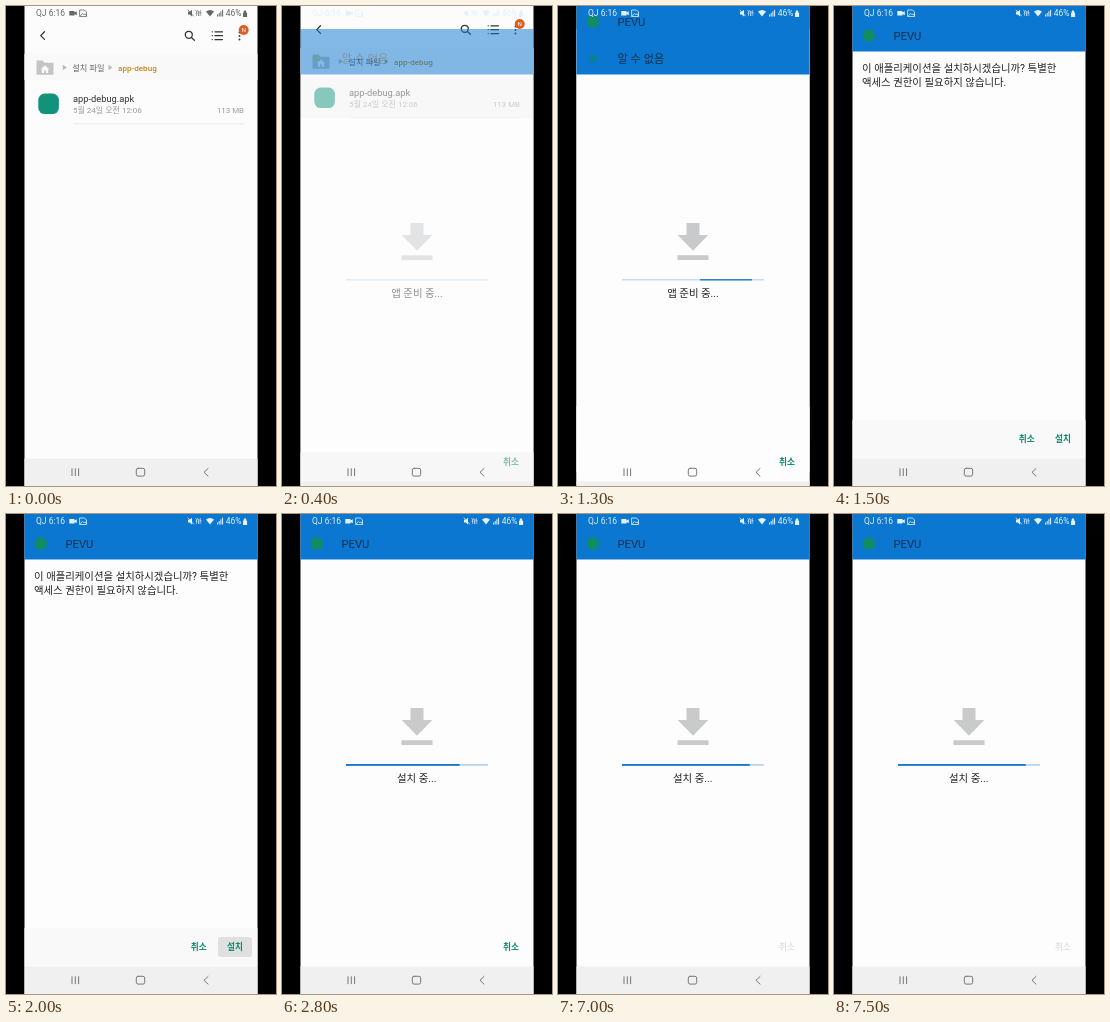
These frames come from a looping animation (270x480 px, 8000 ms). An HTML page:

```html
<!DOCTYPE html>
<html lang="ko">
<head>
<meta charset="utf-8">
<title>App install</title>
<style>
  html, body { margin: 0; width: 100%; height: 100%; overflow: hidden; background: #000; }
  svg { display: block; width: 100%; height: 100%; }
  text { font-family: Roboto, "Noto Sans CJK KR", "Noto Sans CJK", sans-serif; white-space: pre; }
  .line { fill: none; stroke-linecap: round; stroke-linejoin: round; }
  .title { font-size: 11.2px; fill: #12304a; }
  .body { font-size: 10.4px; fill: #222; }
  .status { font-size: 8.5px; }
  .button { font-size: 8.7px; font-weight: 700; fill: #0c8c72; }
  .button.off { font-weight: 400; fill: #d6d6d6; }
</style>
</head>
<body>
<svg viewBox="0 0 270 480">
  <defs>
    <clipPath id="screen"><rect x="18.5" width="233" height="480"/></clipPath>
    <g id="download" fill="#c8cacc">
      <path d="M128.500 194h13v12h8.800L135 221.800 119.700 206h8.800z"/>
      <path d="M119.500 226.300h31v4.800h-31z"/>
    </g>
    <g id="window">
      <rect x="18" width="234" height="480" fill="#fdfdfd"/>
      <rect x="18" y="452.500" width="234" height="40" fill="#f0f0f0"/>
      <rect x="18" y="0" width="234" height="45.500" fill="#0b77d0"/>
    </g>
  </defs>

  <rect width="270" height="480"/>
  <g clip-path="url(#screen)">
    <g id="files">
      <rect x="18" width="234" height="500" fill="#fcfcfc"/>
      <rect x="18" y="48" width="234" height="26" fill="#f9f9f9"/>
      <rect x="18" y="452.500" width="234" height="48" fill="#f0f0f0"/>
      <rect id="press" x="18" y="77" width="234" height="41" fill="#000"/>
      <g class="line" stroke="#333" stroke-width="1.300">
        <path d="M38.500 25.800l-3.800 3.800 3.800 3.800"/>
        <circle cx="182.800" cy="28.800" r="3.500"/>
        <path d="M185.500 31.500l2.800 2.800M209 25.800h7.500M209 29.700h7.500M209 33.600h7.500M206.200 25.800h.1M206.200 29.700h.1M206.200 33.600h.1"/>
        <path d="M233.500 26.500v.1M233.500 30v.1M233.500 33.500v.1" stroke-width="1.900"/>
      </g>
      <circle cx="237.700" cy="24" r="5" fill="#dc5f20"/>
      <text x="237.700" y="26.300" font-size="6.200" fill="#fff" text-anchor="middle">N</text>

      <path d="M30.500 54.500h6l2 2.200h9v12h-17z" fill="#c4c4c4"/>
      <path d="M39 59.300l-4.300 3.900h1.200v3.800h2.200v-2.600h1.800v2.600h2.200v-3.800h1.200z" fill="#fafafa"/>
      <path d="M56.800 58.800l4.200 2.700-4.200 2.700zM102.500 58.800l4.200 2.700-4.200 2.700z" fill="#bbb"/>
      <text x="66.300" y="64.600" font-size="8.200" fill="#666">설치 파일</text>
      <text x="112" y="64.600" font-size="8.100" font-weight="500" fill="#c9851c">app-debug</text>

      <rect x="32.300" y="87.500" width="20.600" height="20.600" rx="6.500" fill="#12917b"/>
      <text x="67" y="95.800" font-size="9.300" fill="#333">app-debug.apk</text>
      <text x="67" y="107.300" font-size="8" fill="#999">5월 24일 오전 12:06</text>
      <text x="238" y="107.300" font-size="7.900" fill="#999" text-anchor="end">113 MB</text>
      <path d="M67 117.800h171" stroke="#e6e6e6" stroke-width=".8"/>
    </g>

    <g id="install">
      <rect x="18" y="-40" width="234" height="41" fill="#0b77d0"/>
      <use href="#window"/>
      <circle cx="34.700" cy="29.600" r="6.300" fill="#128c66"/>
      <text class="title" x="59.500" y="34">PEVU</text>
      <g id="confirm">
        <rect x="18" y="414" width="234" height="38.500" fill="#f9f9f9"/>
        <text class="body" x="28" y="66">이 애플리케이션을 설치하시겠습니까? 특별한</text>
        <text class="body" x="28" y="79.800">액세스 권한이 필요하지 않습니다.</text>
        <rect id="tap" x="212" y="423" width="34" height="20" rx="3" fill="#000"/>
        <text class="button" x="184.700" y="436.400">취소</text>
        <text class="button" x="221" y="436.400">설치</text>
      </g>
      <g id="progress">
        <use href="#download"/>
        <rect x="64" y="250" width="142" height="1.800" fill="#bdd6ee"/>
        <rect id="done" x="64" y="250" height="1.800" fill="#1477c8"/>
        <text class="body" x="134.700" y="267.600" font-size="10.800" text-anchor="middle">설치 중...</text>
        <text class="button" id="cancel" x="221" y="436.400">취소</text>
      </g>
    </g>

    <g id="prepare">
      <use href="#window"/>
      <circle cx="34.700" cy="29.400" r="4" fill="#0f7f91"/>
      <text class="title" x="59.500" y="33.900">알 수 없음</text>
      <use href="#download"/>
      <rect x="64" y="250" width="142" height="1.500" fill="#c6dcf0"/>
      <rect id="sweep" y="250" height="1.500" fill="#2b83c9"/>
      <text class="body" x="135" y="267.600" text-anchor="middle">앱 준비 중...</text>
      <text class="button" x="221" y="436.400">취소</text>
    </g>

    <g id="bar">
      <text class="status" x="30" y="10.300" fill="currentColor">QJ 6:16</text>
      <g fill="currentColor">
        <path d="M63.300 5h5.200v1.500l2.300-1.200v3.900l-2.300-1.200v1.500h-5.200z"/>
        <path d="M182 5.800h1.700l2.300-2v6.800l-2.300-2H182z"/>
        <text x="189.500" y="7" font-size="3.600" font-weight="700">VoL</text>
        <text x="189.500" y="10.300" font-size="3.600" font-weight="700">TE1</text>
        <path d="M200 5.400q4-3 8 0l-4 5z"/>
        <path d="M211 8.500h1v2h-1zM212.700 7h1v3.500h-1zM214.400 5.300h1v5.200h-1zM216.100 3.700h1v6.800h-1z"/>
        <path d="M237 6.700h.7V5.500q1.300-2.600 2.600 0v1.200h.8v4.200H237z"/>
      </g>
      <g class="line" stroke="currentColor" stroke-width=".8">
        <path d="M74 4h4.500l2 2v4.500H74zM74.500 9.800l2-2.500 1.500 1.500 1-1 1.500 2M182 4l5.500 6"/>
      </g>
      <text class="status" x="219.700" y="10.300" fill="currentColor">46%</text>
    </g>
    <g class="line" stroke="#777" stroke-width="1">
      <path d="M66 462.700v7M69.300 462.700v7M72.600 462.700v7M202 462.500l-4 3.800 4 3.800"/>
      <rect x="130.300" y="462.300" width="8.400" height="7.800" rx="1.800"/>
    </g>
  </g>
</svg>
<script>
  const LOOP = 8000, STEP = 100, BAR_X = 64, BAR_W = 142;
  const $ = id => document.getElementById(id);

  // Each track is a list of [time, value] pairs, joined by straight lines.
  const tracks = {
    press: [[100, 0], [200, .05], [300, .08], [500, 0]],
    filesY: [[300, 0], [400, -6], [500, -13], [600, -14]],
    prepareY: [[300, 30], [400, 23], [500, 5], [600, 0], [1200, 0], [1300, 23], [1400, 30]],
    prepareAlpha: [[300, 0], [400, .5], [500, 1], [1300, 1], [1400, .35], [1500, 0]],
    head: [[450, 0], [600, .15], [900, .47], [1300, .915], [1400, 1]],
    tail: [[700, 0], [1000, .22], [1300, .55], [1500, .8]],
    installY: [[1300, -14], [1400, -4], [1500, 0]],
    tap: [[1700, 0], [1800, .05], [2000, .1], [2100, 0]],
    done: [[2100, .04], [2600, .795], [2700, .795], [2800, .8], [5200, .8], [5300, .9]]
  };

  function valueAt(track, t) {
    const next = track.findIndex(([time]) => time > t);
    if (next === 0) return track[0][1];
    if (next < 0) return track[track.length - 1][1];
    const [t0, a] = track[next - 1], [t1, b] = track[next];
    return a + (b - a) * (t - t0) / (t1 - t0);
  }

  const show = (id, on) => { $(id).style.display = on ? '' : 'none'; };
  const shift = (id, y) => $(id).setAttribute('transform', `translate(0 ${y})`);

  function render(t) {
    const v = name => valueAt(tracks[name], t);
    const installing = t >= 2100;
    show('files', t < 1200);
    show('install', t >= 1200);
    show('prepare', t >= 400 && t < 1500);
    show('confirm', !installing);
    show('progress', installing);

    shift('files', v('filesY'));
    shift('prepare', v('prepareY'));
    shift('install', v('installY'));
    $('prepare').setAttribute('opacity', v('prepareAlpha'));
    $('press').setAttribute('opacity', v('press'));
    $('tap').setAttribute('opacity', v('tap'));

    $('sweep').setAttribute('x', BAR_X + BAR_W * v('tail'));
    $('sweep').setAttribute('width', BAR_W * (v('head') - v('tail')));
    $('done').setAttribute('width', BAR_W * v('done'));
    $('cancel').classList.toggle('off', t >= 5300);
    $('bar').setAttribute('color', t < 400 ? '#666' : '#e4f1fc');
  }

  const start = performance.now();
  function tick() {
    const t = (performance.now() - start) % LOOP;
    render(Math.floor(t / STEP) * STEP);
    requestAnimationFrame(tick);
  }
  tick();
</script>
</body>
</html>
```
